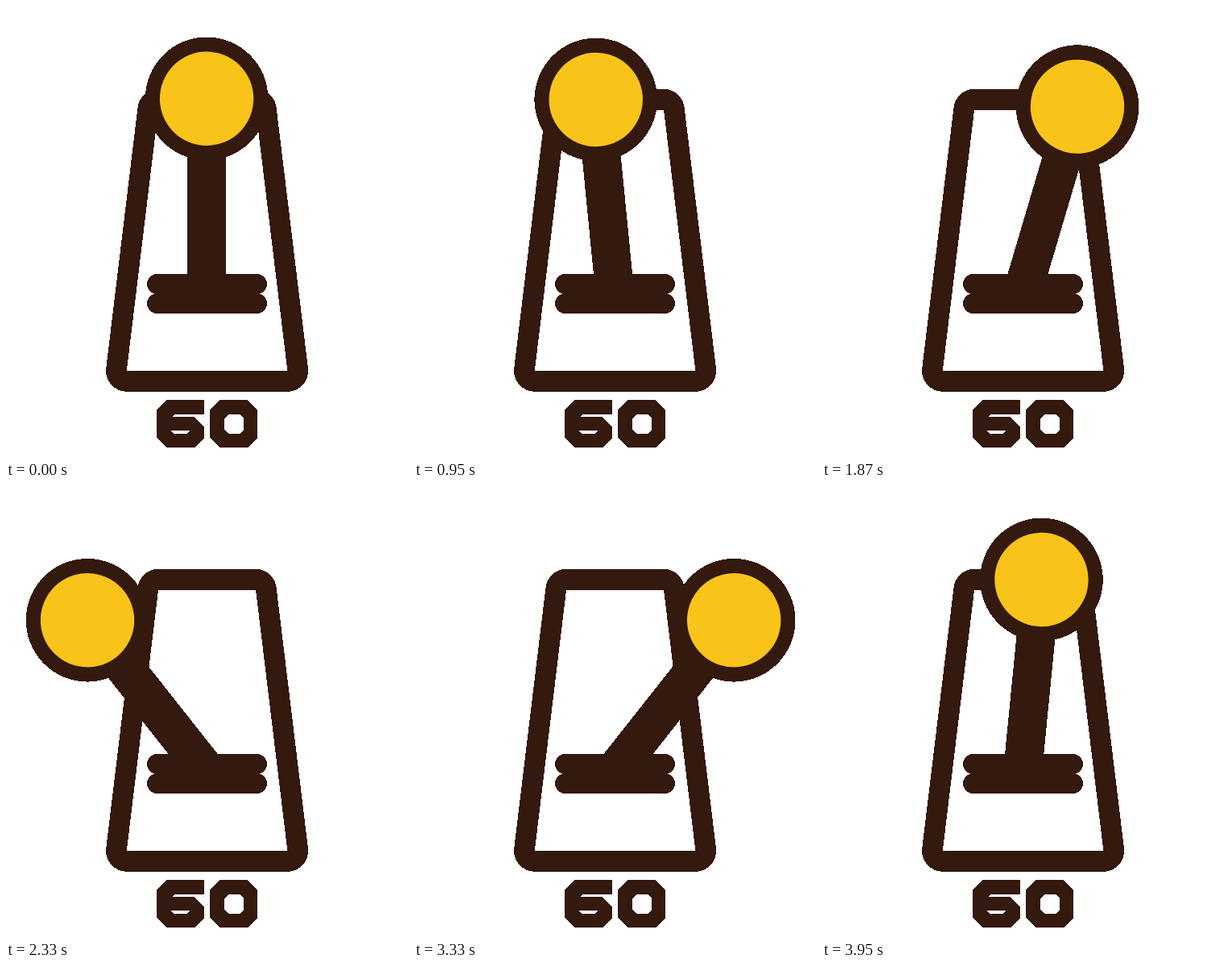
An HTML page for the animation above (4 s loop, 499 px wide and 560 px high).

```html
<!DOCTYPE html>
<html lang="en">
<head>
<meta charset="utf-8">
<title>Metronome</title>
<style>
  html, body { margin: 0; width: 100%; height: 100%; overflow: hidden; background: #fff; }
  svg { display: block; }
  .dark { fill: #33190e; shape-rendering: crispEdges; }
  .outline { stroke: #33190e; stroke-width: 51.5; stroke-linejoin: round; }
  .window { fill: #fff; shape-rendering: crispEdges; }
</style>
</head>
<body>
<svg width="499" height="560" viewBox="0 0 499 560">
  <!-- case: a sharp window inside a rounded outline -->
  <defs><path id="case" d="M189.1 128.5H310L349.4 452H149.8Z"/></defs>
  <use href="#case" class="dark outline"/>
  <use href="#case" class="window"/>

  <g id="arm">
    <path class="dark" d="M-24 0V-238.7H24V0Z"/>
    <circle class="dark" cy="-238.7" r="76.3"/>
    <circle cy="-238.7" r="58.2" fill="#f9c41a"/>
  </g>

  <g class="dark">
    <rect x="175" y="332" width="149" height="25" rx="12.5"/>
    <rect x="175" y="356" width="149" height="25" rx="12.5"/>
  </g>

  <g class="dark" role="img" aria-label="60" fill-rule="evenodd">
    <path d="M199 488H246V506H209L206 509H233L246 521V535L234 547H199L187 535V500Z
             M205 526H228L225 530H208Z"/>
    <path d="M265 488H299L312 501V535L300 547H265L253 535V500Z
             M276 506H290L295 511V525L290 530H276L271 525V511Z"/>
  </g>
</svg>
<script>
  const FPS = 24, LOOP = 4000, SWING = 45;
  const arm = document.getElementById('arm');

  // Eased swing between the extremes, one second each way, starting mid-swing.
  function angleAt(seconds) {
    const phase = (seconds + 0.5) % 2;
    const u = phase < 1 ? phase : 2 - phase;
    return SWING * (1 - 2 * u * u * (3 - 2 * u));
  }

  function draw(now) {
    // Poses are held at 24 per second, with start times cut to 10 ms.
    const tick = Math.floor((now % LOOP) / 10) * 10 + 10;
    const step = Math.ceil(tick * FPS / 1000) - 1;
    arm.setAttribute('transform', `translate(249.1 353.5) rotate(${angleAt(step / FPS)})`);
  }

  const start = performance.now();
  function loop() {
    draw(performance.now() - start);
    requestAnimationFrame(loop);
  }
  draw(0);
  requestAnimationFrame(loop);
</script>
</body>
</html>
```
